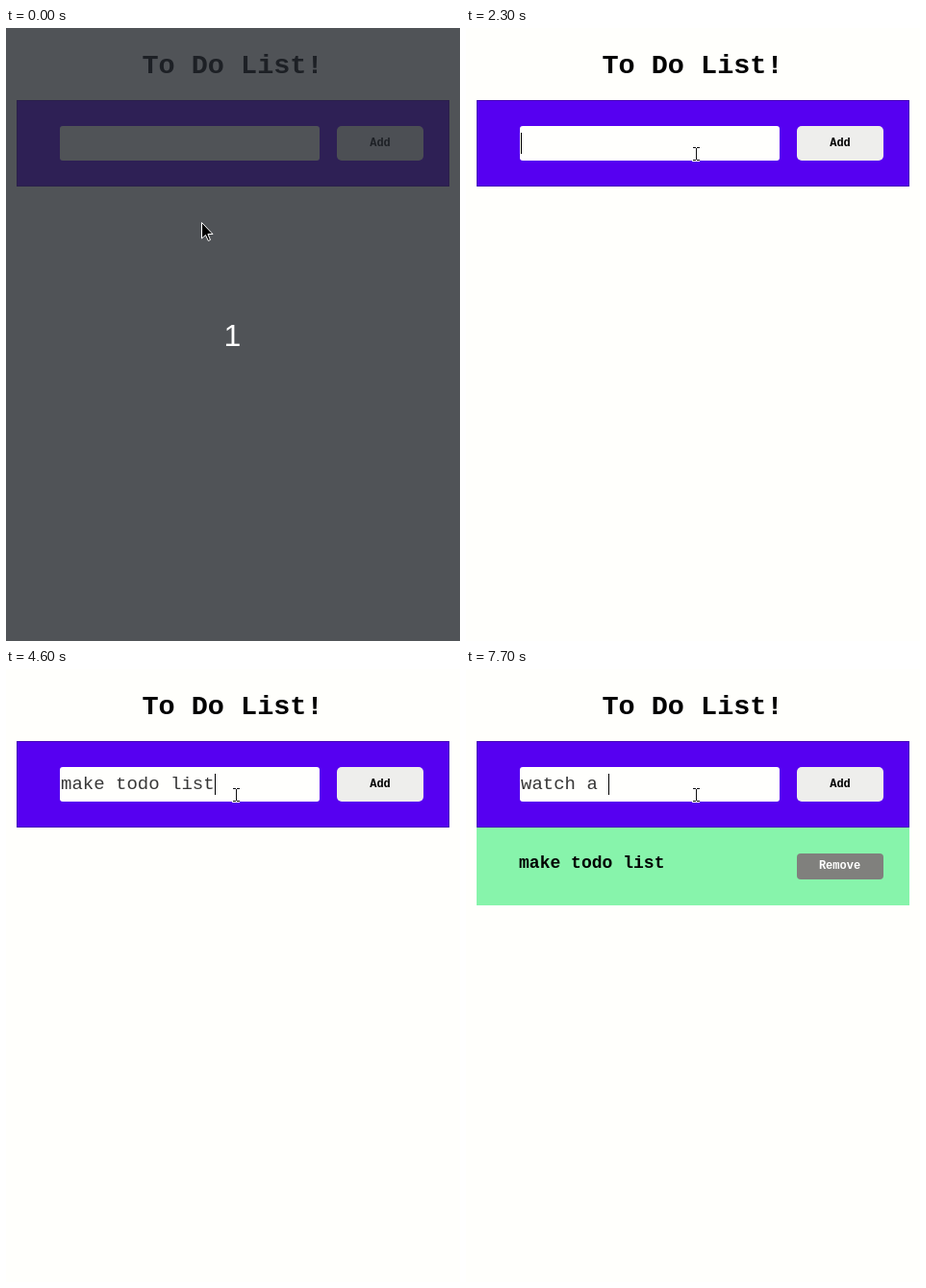
These frames come from a looping animation (472 by 638 pixels, 8 s). An HTML page with a canvas:

```html
<!DOCTYPE html>
<html lang="en">
<head>
<meta charset="utf-8">
<title>To Do List</title>
<style>
  html, body { margin: 0; width: 100%; height: 100%; overflow: hidden; background: #fffffc; }
  canvas { display: block; }
</style>
</head>
<body>
<canvas id="stage" width="472" height="638"></canvas>
<script>
const ctx = document.getElementById('stage').getContext('2d');
const LOOP = 8000;
const MONO = '"Liberation Mono", monospace';
const TASK = 'make todo list';
const NEXT_TASK = 'watch a ';
const START = 300, ADDED = 5100;

// [time, number of typed characters]
const typing = [
  [0, 0], [2500, 1], [2600, 2], [2700, 4], [2800, 5], [3000, 6], [3300, 8],
  [3500, 9], [3700, 10], [4300, 11], [4400, 12], [4600, 14], [ADDED, 0],
  [6100, 1], [6400, 2], [6800, 4], [7000, 5], [7200, 6], [7400, 7], [7700, 8]
];
// [time, caret visible]
const blinking = [
  [0, false], [1500, true], [1700, false], [2300, true],
  [4100, false], [4300, true], [5700, false], [6100, true]
];
// [time, x, y, shape]
const pointer = [
  [0, 203, 202, arrow], [300, 205.5, 198, arrow], [400, 201, 176, arrow],
  [600, 208, 163, arrow], [700, 221, 147, arrow],
  [800, 233, 136, beam], [900, 239, 131, beam]
];

const current = (track, t) => track.filter(key => key[0] <= t).pop();

function box(x, y, w, h, color, radius = 0) {
  ctx.fillStyle = color;
  ctx.beginPath();
  ctx.roundRect(x, y, w, h, radius);
  ctx.fill();
}

function label(text, x, y, font, color, align = 'left') {
  ctx.font = font;
  ctx.fillStyle = color;
  ctx.textAlign = align;
  ctx.fillText(text, x, y);
}

function arrow(x, y) {
  const points = [[0, 0], [0, 16.5], [4, 13], [6.8, 19], [9, 18], [6.4, 12], [11.5, 12]];
  ctx.beginPath();
  points.forEach(([dx, dy]) => ctx.lineTo(x + dx + 0.5, y + dy + 0.5));
  ctx.closePath();
  ctx.fillStyle = '#000';
  ctx.fill();
  ctx.strokeStyle = '#fff';
  ctx.lineWidth = 1;
  ctx.stroke();
}

function beam(x, y) {
  box(x - 4, y - 8, 8, 3, '#fff');
  box(x - 4, y + 5, 8, 3, '#fff');
  box(x - 1, y - 6, 3, 12, '#fff');
  for (const dy of [-7, 6]) {
    box(x - 3, y + dy, 3, 1, '#111');
    box(x + 1, y + dy, 3, 1, '#111');
  }
  box(x, y - 6, 1, 12, '#111');
}

function drawForm(t) {
  box(11, 75, 450, 90, '#4300b8');
  box(12, 76, 448, 88, '#5600f1');
  box(56, 102, 270, 36, '#fffffd', 3);
  box(344, 102, 90, 36, '#eeeeec', 5);
  label('Add', 389, 123, `bold 12px ${MONO}`, '#000', 'center');

  const count = current(typing, t)[1];
  const text = (t < ADDED ? TASK : NEXT_TASK).slice(0, count);
  label(text, 57, 125, `19px ${MONO}`, '#383838');
  if (current(blinking, t)[1]) box(Math.round(57 + 11.4 * count), 109, 1, 22, '#000');
}

function drawTask() {
  box(11, 165, 450, 81, '#87f4ab');
  label(TASK, 55, 207, `bold 18.05px ${MONO}`, '#000');
  box(344, 192, 90, 27, '#80807d', 4);
  label('Remove', 388.5, 208, `bold 12px ${MONO}`, '#fff', 'center');
}

function draw(t) {
  box(0, 0, 472, 638, '#fffffc');
  label('To Do List!', 235.5, 47, `bold 28.5px ${MONO}`, '#000', 'center');
  drawForm(t);
  if (t >= ADDED) drawTask();
  if (t < START) {
    box(0, 0, 472, 638, 'rgba(37, 40, 47, 0.8)');
    label('1', 235.5, 331, '32px "Liberation Sans", sans-serif', '#fff', 'center');
  }
  const [, x, y, shape] = current(pointer, t);
  shape(x, y);
}

const began = performance.now();
function tick() {
  draw((performance.now() - began) % LOOP);
  requestAnimationFrame(tick);
}
tick();
</script>
</body>
</html>
```
